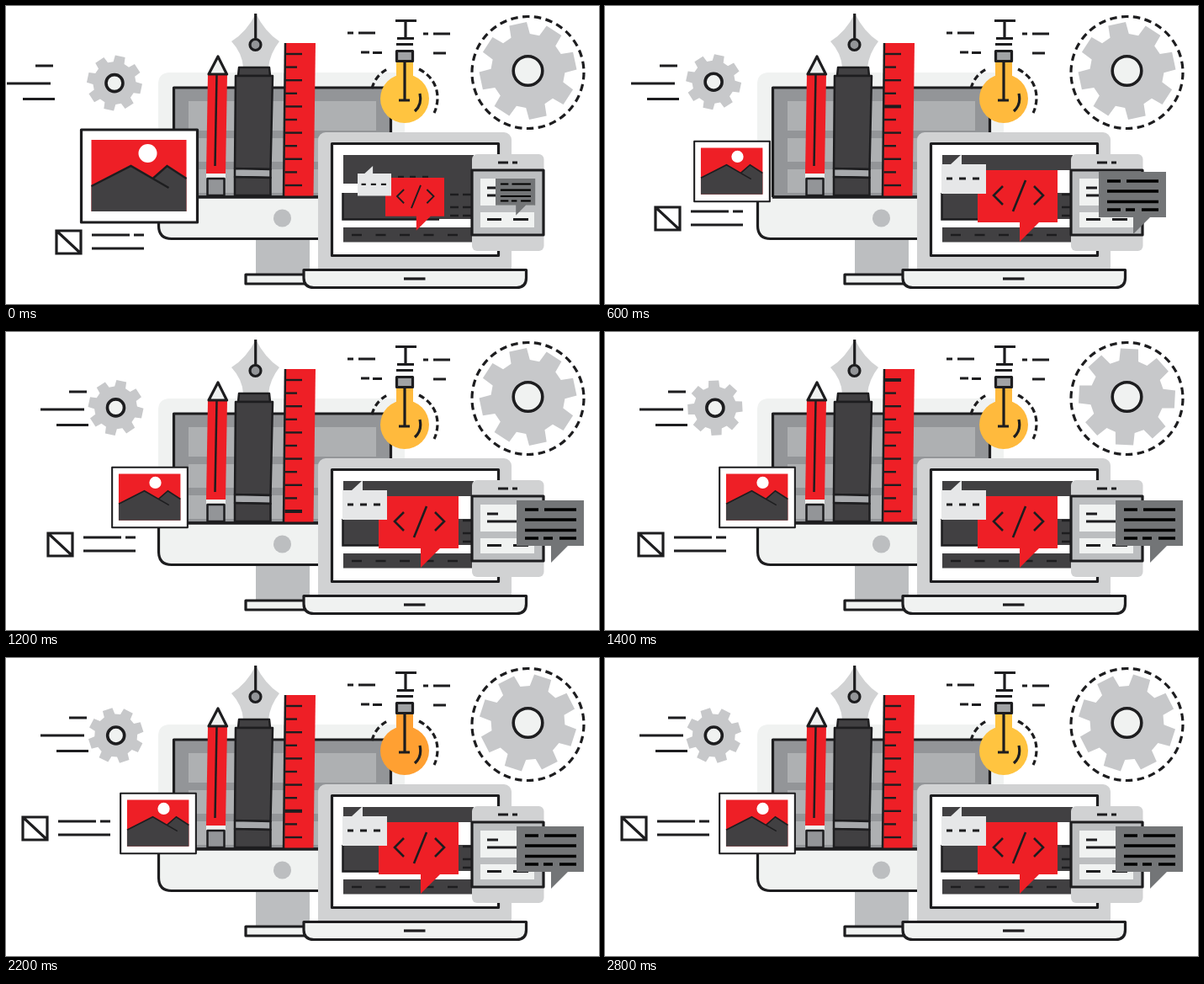
An HTML page for the animation above (3000 ms loop, 705 by 354 pixels).

```html
<!DOCTYPE html>
<html lang="en">
<head>
<meta charset="utf-8">
<title>Design and development</title>
<style>
html, body { margin: 0; width: 100%; height: 100%; overflow: hidden; background: #fff; }
svg { display: block; width: 705px; height: 354px; }
.ln { fill: none; stroke: #1d1d1f; stroke-width: 3.2; }
.box { stroke: #1d1d1f; stroke-width: 3.2; stroke-linejoin: round; }
.pale { fill: #f0f2f1; }
.light { fill: #d1d2d3; }
.mid { fill: #bcbec0; }
.gray { fill: #939598; }
.dark { fill: #414042; }
.red { fill: #ee1f26; }
.white { fill: #fff; }
.cog { fill: #c7c8ca; }
</style>
</head>
<body>
<svg viewBox="0 0 705 354">
  <!-- monitor -->
  <path class="pale" d="M181 240V93Q181 79 195 79H460Q474 79 474 93V160H380V240Z"/>
  <rect class="box gray" x="199.500" y="97" width="258" height="130"/>
  <path fill="#aeb0b2" d="M217 113H440V148H217ZM217 157H440V185H217ZM217 194H440V222H217Z"/>
  <rect class="mid" x="297" y="276" width="64" height="43"/>
  <rect class="box pale" x="285" y="319" width="76" height="11"/>
  <path class="box pale" d="M181.500 228V261Q181.500 276.500 197 276.500H380V227H199"/>
  <path fill="none" stroke="#f0f2f1" stroke-width="4" d="M181.500 224V231"/>
  <circle class="mid" cx="328.500" cy="252" r="10.500"/>

  <!-- pencil -->
  <path class="red" d="M240 81H263L261 199H238Z"/>
  <path class="pale" d="M238 199H261V205H238Z"/>
  <path class="box pale" stroke-width="2.500" d="M241 81L252 60L262.500 81Z"/>
  <path class="ln" style="stroke-width:2.500" d="M250.500 82L248.500 190"/>
  <rect class="box gray" style="stroke-width:2.500" x="239.500" y="205" width="20" height="20"/>

  <!-- fountain pen -->
  <path class="light" d="M297 9Q308 31 325 42Q314 56 312 73H282Q281 56 268 42Q286 31 297 9Z"/>
  <path class="ln" d="M296.700 9V40"/>
  <circle class="box gray" cx="296.500" cy="46" r="6.500"/>
  <g class="box dark" style="stroke-width:2.500">
    <path d="M277 73H313L314 83H276Z"/>
    <path d="M273 83H317L314.500 194L272 193Z"/>
    <path fill="#a7a9ac" d="M272 193L314.500 194V204L272 203Z"/>
    <path d="M272 203L314.500 204V225H272Z"/>
  </g>

  <!-- ruler -->
  <path class="red" d="M332 44H368L365.500 226H329.500Z"/>
  <path class="ln" style="stroke-width:2.500" d="M332 44L330 226"/>
  <g id="ticks"></g>
  <path class="ln" d="M199 227H372"/>

  <!-- bulb -->
  <g id="bulb"><circle cx="474" cy="110" r="29"/><path d="M464 66H484V90H464Z"/></g>
  <rect class="box" fill="#a1a3a5" x="464.500" y="53.500" width="19" height="12"/>
  <path class="ln" d="M463 17.500H488M475 17V38M465 38.500H485M464 45.500H484M474 66V112M467 112H480M492 104Q495 117 486 125"/>
  <path class="ln" stroke-dasharray="7 4" d="M435 98Q439 83 453 75M491 75Q512 86 513 108Q513 119 509 127"/>
  <path class="ln" d="M406 32H413M419 32H439M496 33H502M508 33H528M422 55H432M436 55.500H447M508 56H523"/>

  <!-- gears -->
  <circle class="ln" cx="620.500" cy="79" r="66.500" stroke-dasharray="8.500 5.425"/>
  <path class="cog" id="bigCog"/>
  <circle class="box pale" style="stroke-width:3.600" cx="620.500" cy="77" r="17.300"/>
  <path class="ln" id="dashes" d="M35 71H56M1 92H53M20 110.500H58"/>
  <g id="smallGear">
    <path class="cog" id="smallCog"/>
    <circle class="box pale" style="stroke-width:3.600" r="10"/>
  </g>

  <!-- laptop -->
  <rect class="light" x="371" y="150" width="230" height="175" rx="9"/>
  <rect class="box white" x="387.500" y="163.500" width="198" height="133"/>
  <path class="dark" d="M401 177H556V253H400V222H450V211H401Z"/>
  <path id="gap" class="white" d="M536 195H556V222H536Z"/>
  <path class="dark" d="M401 263H554V280.500H401Z"/>
  <path class="ln" style="stroke-width:2.500" d="M400.500 222V253.500H515M528 224H538M543 224H553M528 239H538M543 239H553M528 249H538M543 249H553M466 203H473M480 203H487M495 203H502"/>
  <path class="ln" style="stroke-width:2.500" stroke-dasharray="12 16.500" d="M411 272H554"/>
  <path class="box pale" d="M354 313.500H618.500V323Q618.500 334.500 607 334.500H366Q354 334.500 354 323Z"/>
  <path class="ln" d="M473 324H498.500"/>

  <!-- phone -->
  <rect class="light" x="554" y="176" width="85.500" height="115" rx="6"/>
  <path class="ln" d="M585 186H597M602 186H608"/>
  <rect class="box mid" x="554" y="195" width="85" height="77"/>
  <path class="pale" d="M564 205H628V237H564ZM564 245H628V263H564Z"/>
  <path class="ln" d="M572 216H585M572 225H607M572 253.500H589M603 253.500H621"/>

  <!-- speech bubbles -->
  <g id="codeBubble">
    <path class="red" d="M0 0H95V62H73L50 85V62H0Z"/>
    <path class="ln" style="stroke-width:2.600" d="M30 19L19 30L30 41M57 12L42 49M67 19L78 30L67 41"/>
  </g>
  <g id="paleBubble">
    <path fill="#e6e7e8" d="M0 0H11L24-12V0H53V35H0Z"/>
    <path class="ln" d="M6 17H13M21 17H29M37 17H45"/>
  </g>
  <g id="textBubble">
    <path fill="#737577" d="M0 0H80V54H61L41 74V54H0Z"/>
    <path class="ln" style="stroke:#000;stroke-width:3.600" d="M10 11H26M33 11H71M10 23H71M10 35.500H71M10 45H26M32 45H43M51 45H71"/>
  </g>

  <!-- picture -->
  <g id="picture">
    <rect class="box white" x="-69" y="-55" width="138" height="110"/>
    <path class="red" d="M-57-43H56V42H-57Z"/>
    <circle class="white" cx="10" cy="-27" r="11"/>
    <path class="dark" d="M-57 12L-10-12L16 3L33-12L56 3V42H-57Z"/>
    <path class="ln" style="stroke-width:2.500" d="M-57 12L-10-12L35 14M16 3L33-12L56 3"/>
  </g>

  <!-- check box with caption -->
  <g id="note" class="ln">
    <path d="M1 1H30V28H1ZM1 1L30 28"/>
    <path d="M43 6H88M93 6H105M43 22H105"/>
  </g>
</svg>
<script>
const STEP = 200, STEPS = 15;
const $ = id => document.getElementById(id);
const lerp = (a, b, k) => a + (b - a) * k;
const place = (id, x, y, scale = 1) =>
  $(id).setAttribute('transform', `translate(${x} ${y}) scale(${scale})`);

function cogPath(outer, root, teeth = 8) {
  const points = [];
  for (let i = 0; i < teeth; i++) {
    for (const [offset, r] of [[-15, root], [-10.5, outer], [10.5, outer], [15, root]]) {
      const a = (i * 360 / teeth + offset) * Math.PI / 180;
      points.push(`${(r * Math.sin(a)).toFixed(2)} ${(-r * Math.cos(a)).toFixed(2)}`);
    }
  }
  return `M${points.join('L')}Z`;
}
$('bigCog').setAttribute('d', cogPath(58, 44));
$('smallCog').setAttribute('d', cogPath(33, 25.5));

const ticks = Array.from({ length: 11 }, (_, i) => {
  const tick = document.createElementNS('http://www.w3.org/2000/svg', 'path');
  const y = 57 + i * 15.6;
  tick.setAttribute('class', 'ln');
  tick.setAttribute('d', `M331.5 ${y}H${i % 2 ? 346 : 352}`);
  return $('ticks').appendChild(tick);
});

// Grow from a first placement [x, y, scale] to a full-size one.
const grow = (id, from, to, k) => place(id, ...from.map((v, i) => lerp(v, to[i], k)));

function bulbColor(n) {
  if (n >= 11 && n <= 13) return '#ffa032';
  return (n >= 1 && n <= 3) || (n >= 5 && n <= 7) ? '#ffba3d' : '#ffc440';
}

const noteX = [59, 59, 59, 59, 69, 69, 49, 39, 19];
const noteY = [266, 256, 247, 238, 238, 238, 238, 238, 238, 218, 198, 188];
const pictureX = [0, 10, 10, 20, 30];
const at = (list, n) => list[Math.max(0, Math.min(n, list.length - 1))];

function draw(n) {
  const k = Math.min(n / 3, 1);
  const slide = Math.max(0, Math.min(n - 3, 2));

  place('dashes', Math.min(n, 4) * 10, 0);
  place('note', at(noteX, n), at(noteY, n));
  grow('picture', [158.5, 202, 1], [151 + at(pictureX, n - 3), 196.5, 0.65], k);
  grow('codeBubble', [451, 204, 0.737], [443, 195, 1], k);
  grow('paleBubble', [418, 199, 0.755], [400, 188, 1], k);
  grow('textBubble', [582, 205, 0.59], [587 + slide * 10, 197 + slide * 1.5, 1], k);
  $('gap').style.display = n ? '' : 'none';

  $('bigCog').setAttribute('transform', `translate(620.5 77) rotate(${n * 15 - 12})`);
  $('smallCog').setAttribute('transform', `rotate(${12 - n * 15})`);
  const wobble = (150 + n * 24) * Math.PI / 180;
  place('smallGear', 130 + 1.2 * Math.cos(wobble), 91 + 1.2 * Math.sin(wobble));

  $('bulb').setAttribute('fill', bulbColor(n));
  const bold = n > 0 && n < 14 ? (n - 1) * 2 % 12 : -1;
  ticks.forEach((tick, i) => tick.style.strokeWidth = i === bold ? 4 : 2.4);
}

function frame(now) {
  draw(Math.floor(now / STEP) % STEPS);
  requestAnimationFrame(frame);
}
draw(0);
requestAnimationFrame(frame);
</script>
</body>
</html>
```
